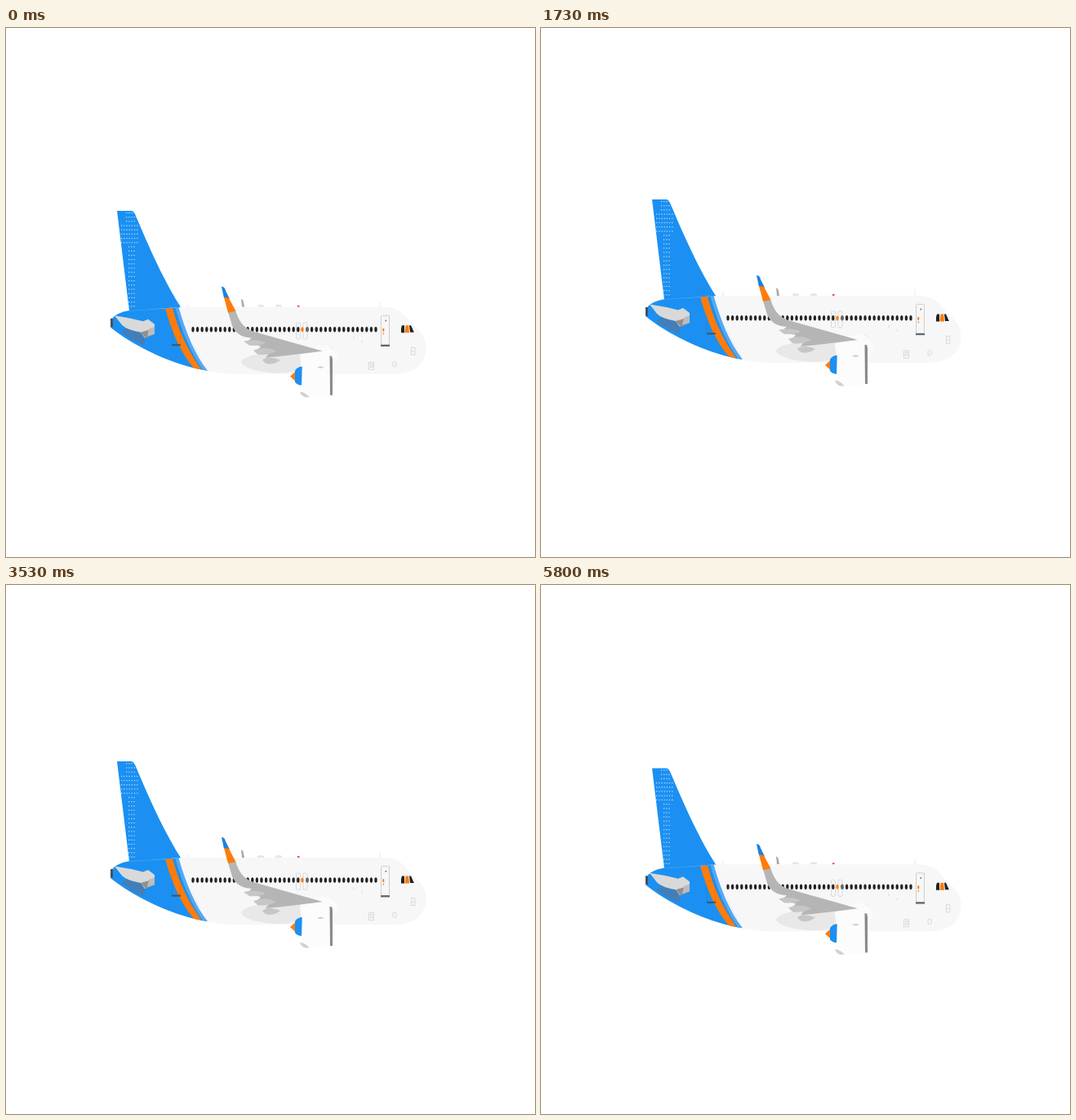
These frames come from a looping animation (648x648 px, 5830 ms). An HTML page:

```html
<!DOCTYPE html>
<html lang="en">
<head>
<meta charset="utf-8">
<title>Airliner</title>
<style>
html, body { margin: 0; width: 100%; height: 100%; overflow: hidden; background: #fff; }
svg { display: block; width: 100vw; height: 100vh; }
</style>
</head>
<body>
<svg viewBox="0 0 648 648">
  <defs>
    <clipPath id="fin"><path d="M136 224H153Q156 224 158 228C172 261 191 306 214 342L151 347Z"/></clipPath>
  </defs>
  <g id="plane">
    <!-- aerials -->
    <path d="M288 332L290.5 334L292 342H289Z" fill="#a9a9a9"/>
    <path d="M223 337V343M458 335V343" stroke="#e9e9e9"/>
    <path d="M308 342V340Q312 338 316 340V342ZM330 342V340Q334 338 338 340V342Z" fill="#e6e6e6"/>
    <rect x="357" y="340" width="2.5" height="2" fill="#f2423a"/>

    <!-- fuselage -->
    <path d="M195 343L214 342H464C480 342 488 350 497 363C509 372 515 381 514.5 394C513.5 413 499 423.5 476 424H275Q258 423 240 419Z" fill="#f7f7f7"/>
    <path d="M131 355Q137 348.5 150 346.5L214 342.3C221 370 232 397 247 420Q238 419 229 416.5C196 408 155 389 128 367Z" fill="#1b90f2"/>
    <path d="M128 356H131V367L128 366Z" fill="#4a4f55"/>
    <path d="M195 343.6C203 372 214 398 230 416.7L239.5 418.7C223 396 211 370 204 343Z" fill="#ff7c0a"/>
    <path d="M207.5 342.8L211.5 342.5C220 372 231 400 247 420L241 419C226 397 215 371 207.5 342.8Z" fill="#55a8f3"/>
    <path d="M211.5 342.4H216C222 371 232 398 248 420H247C231 400 220 372 211.5 342.4Z" fill="#f7f7f7"/>
    <path d="M203.5 388V362H213.5V388" fill="none" stroke="#000" stroke-opacity=".06"/>
    <rect x="203" y="387.5" width="11" height="2" fill="#48525e"/>

    <!-- fin and tailplane -->
    <g clip-path="url(#fin)">
      <rect x="130" y="220" width="90" height="130" fill="#1b90f2"/>
      <g id="dots" fill="#b9dcfb"></g>
    </g>
    <path d="M150 346.7L212 342.4" stroke="#499fe9" stroke-width=".7"/>
    <path d="M141 373L151 365L172 374L169 389Q154 383 141 373Z" fill="#427fb8"/>
    <path d="M133 352.5Q151 355 168 359.5L174 357L182 363V375L170 380L165 373Q148 370 142 364Z" fill="#d9d9d9"/>
    <path d="M165 373L182 368V375L171 380Z" fill="#8f8f8f"/>
    <path d="M175 369L182 366V375L173 378Z" fill="#bcbcbc"/>

    <!-- windows and doors -->
    <g id="windows" fill="#222"></g>
    <g fill="none" stroke="#d4d4d4" stroke-width=".8">
      <rect x="355.5" y="361" width="5" height="20" rx="1"/>
      <rect x="364" y="361" width="5" height="20" rx="1"/>
      <rect x="459.5" y="352.5" width="10" height="36" rx="1" stroke="#c4c4c4"/>
      <rect x="444.5" y="409.5" width="6" height="9"/>
      <rect x="446.5" y="411.5" width="2.5" height="4"/>
      <rect x="474" y="409" width="4" height="6" rx="1"/>
      <rect x="496.5" y="391.5" width="4.5" height="9"/>
      <path d="M497 396H500M426 378V381M436 383V386"/>
    </g>
    <rect x="459" y="388" width="11" height="2.3" fill="#666"/>
    <g fill="#ff7c0a">
      <ellipse cx="363" cy="369.5" rx="1.6" ry="3"/>
      <ellipse cx="462.3" cy="370" rx="1.1" ry="2.2"/>
      <circle cx="462.3" cy="374.5" r=".9"/>
    </g>
    <circle cx="465.3" cy="358.7" r="1" fill="#bd5550"/>
    <path d="M485 364.5H488V373.5H484V368Z" fill="#222"/>
    <path d="M489.5 364.5H493L494 373.5H488.5Z" fill="#ff7c0a"/>
    <path d="M494 364.5H496L499.8 373H495Z" fill="#222"/>

    <!-- wing -->
    <path d="M288 410C291 402 306 399 328 399L398 390Q410 401 400 414L360 419Q342 425 320 422Q294 419 288 410Z" fill="#e8e8e8"/>
    <path d="M360 401Q372 391 392 389Q406 393 407 405L399 419H362Z" fill="#fbfbfb"/>
    <path d="M272 348L281 346C285 359 291 368 303 372L388 396Q350 401 318 404L322 399L308 395L312 390L294 386L301 380Q283 379 277 365Z" fill="#b5b5b5"/>
    <g fill="#c6c6c6">
      <path d="M291 384Q306 380 318 386Q309 390 298 389Z"/>
      <path d="M303 395Q317 389 331 396Q320 402 308 400Z"/>
      <path d="M314 407Q321 401 336 407Q327 414 318 411Z"/>
    </g>
    <path d="M264 317Q268 317 269 322L274 332L267 331Z" fill="#1b83dc"/>
    <path d="M267 330L273 331L281.5 347L272 349Z" fill="#ff7c0a"/>

    <!-- engine -->
    <path d="M354 421.5L348 427L354 432.5Z" fill="#ff7c0a"/>
    <path d="M363 415Q357 415 354 420V434Q357 438 363 438Z" fill="#1b90f2"/>
    <path d="M363 405Q374 399 399 402L400 450Q385 454 369 452Q362 448 362 441Z" fill="#fcfcfc"/>
    <path d="M396.5 402H399L400 406V450H397Z" fill="#8b8b8b"/>
    <path d="M360 446Q365 445 372 452.5H366Q361 450 360 446Z" fill="#d2d2d2"/>
    <path d="M381 416Q385 413 390 416Q386 418 381 416Z" fill="#d0d0d0"/>
  </g>
</svg>
<script>
const get = id => document.getElementById(id);
const plane = get('plane');

let dots = '';
for (let row = 0; row < 23; row++) {
  const y = 226 + row * 5.2;
  const [from, to] = row < 3 ? [147, 157] : row < 8 ? [141, 163] : [150, 157];
  for (let x = from; x <= to; x += 3.2)
    dots += `<rect x="${x}" y="${y}" width="1.3" height="1.2"/>`;
}
get('dots').innerHTML = dots;

let panes = '';
for (let i = 0; i < 41; i++) {
  const x = 229 + i * 5.6;
  if (Math.abs(x - 363) > 2) panes += `<ellipse cx="${x}" cy="369.4" rx="1.65" ry="3.3"/>`;
}
get('windows').innerHTML = panes;

const LOOP = 5830, PERIOD = 2925, LEAD = 50, LIFT = 18, REST = 0.3;

// Softly rounded triangle wave: 0 at rest, 1 at the top.
function rise(t) {
  const p = t % PERIOD / PERIOD;
  const linear = 1 - Math.abs(1 - 2 * p);
  const smooth = (1 - Math.cos(2 * Math.PI * p)) / 2;
  return 0.7 * linear + 0.3 * smooth;
}

function draw(now) {
  const t = now % LOOP;
  // Poses alternate between 30 ms and 70 ms holds.
  const pose = Math.floor(t / 100) * 100 + (t % 100 >= 30 ? 50 : 0);
  plane.setAttribute('transform', `translate(0 ${(REST - LIFT * rise(pose + LEAD)).toFixed(2)})`);
  requestAnimationFrame(draw);
}
draw(performance.now());
</script>
</body>
</html>
```
